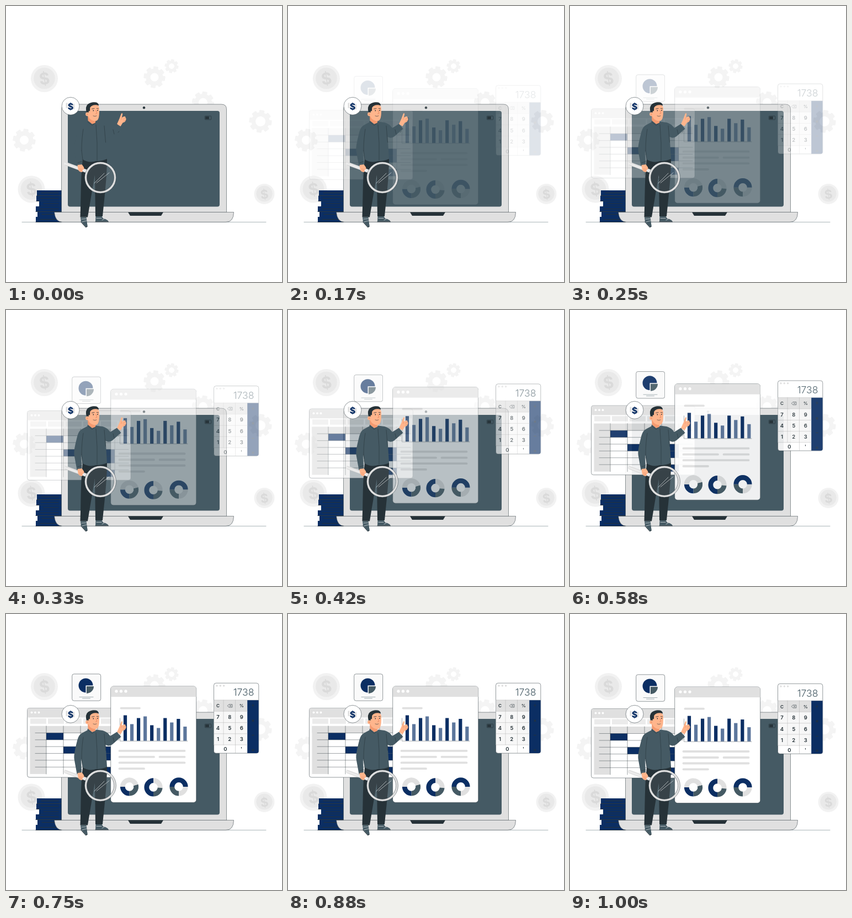
An HTML page for the animation above (1.04 s loop, 500 px wide and 500 px high).

```html
<!DOCTYPE html>
<html lang="en">
<head>
<meta charset="utf-8">
<title>Financial data</title>
<style>
  html, body { margin: 0; width: 100%; height: 100%; overflow: hidden; background: #fff; }
  svg { display: block; width: 100vw; height: 100vh; }
  text { font-family: Inter, Lato, sans-serif; text-anchor: middle; dominant-baseline: central; }
</style>
</head>
<body>
<svg id="stage" viewBox="0 0 500 500"></svg>
<script>
const NAVY = '#0b2e63', SLATE = '#455a64', INK = '#263238', GREY = '#e0e0e0', SKIN = '#ffb58c';
const EDGE = `stroke="${INK}" stroke-width=".5"`;

const rect = (x, y, w, h, fill, more = '') =>
  `<rect x="${x}" y="${y}" width="${w}" height="${h}" fill="${fill}" ${more}/>`;
const circle = (x, y, r, fill, more = '') =>
  `<circle cx="${x}" cy="${y}" r="${r}" fill="${fill}" ${more}/>`;
const path = (d, fill, more = '') => `<path d="${d}" fill="${fill}" ${more}/>`;
const line = (d, color, width = 0.5, more = '') =>
  path(d, 'none', `stroke="${color}" stroke-width="${width}" stroke-linecap="round" ${more}`);
const text = (x, y, size, str, fill = INK, weight = 500, more = '') =>
  `<text x="${x}" y="${y}" font-size="${size}" font-weight="${weight}" fill="${fill}" ${more}>${str}</text>`;
const dots = (x, y, gap, r, fill) => [0, 1, 2].map(i => circle(x + i * gap, y, r, fill)).join('');
const pop = inner => `<g class="pop">${inner}</g>`;

// Angles run clockwise in degrees from the top.
function ring(cx, cy, r, width, from, to, color) {
  const at = a => {
    const q = (a - 90) * Math.PI / 180;
    return `${cx + r * Math.cos(q)} ${cy + r * Math.sin(q)}`;
  };
  return path(`M${at(from)}A${r} ${r} 0 ${to - from > 180 ? 1 : 0} 1 ${at(to)}`, 'none',
    `stroke="${color}" stroke-width="${width}"`);
}

function gear(x, y, r, hole, turn = 0) {
  const fill = '#f4f4f4', mid = (r * 0.8 + hole) / 2;
  let teeth = '';
  for (let i = 0; i < 8; i++) {
    teeth += rect(-r * 0.23, -r, r * 0.46, r * 0.4, fill,
      `rx="${r * 0.08}" transform="rotate(${i * 45})"`);
  }
  return `<g transform="translate(${x} ${y}) rotate(${turn})">${teeth}` +
    circle(0, 0, mid, 'none', `stroke="${fill}" stroke-width="${r * 0.8 - hole}"`) + '</g>';
}

const coin = (x, y, r) =>
  circle(x, y, r, '#f2f2f2') + circle(x, y - 0.5, r * 0.79, '#e9e9e9') +
  text(x, y, r * 1.2, '$', '#dadada', 700, `transform="rotate(-8 ${x} ${y})"`);

function backdrop() {
  const slabs = [[56, 334], [55, 344], [60, 353.5], [54, 363], [57, 373], [54, 382]];
  return gear(269, 129, 19.5, 7.5, 8) + gear(300, 109, 12.5, 5, 10) + gear(357, 175, 20, 8, 10) +
    gear(461, 209, 20.5, 9, 8) + gear(33, 243, 20.5, 8, 10) +
    coin(69.5, 131.5, 24.5) + coin(46, 332, 24.5) + coin(468, 340.5, 18.5) +
    line('M29 391.5H471', SLATE, 0.45) +
    slabs.map(([x, y]) => rect(x, y, 101 - x, 9.7, NAVY) +
      line(`M${x} ${y + 9.5}H101M${x + 8} ${y + 4.5}H95`, INK, 0.9)).join('');
}

function laptop() {
  return path('M100.5 374V187Q100.5 178 110 178H390Q399.5 178 399.5 187V374Z', GREY, EDGE) +
    rect(112, 190, 275, 173.5, SLATE, 'rx="4"') + circle(250, 184.2, 2.2, INK) +
    rect(360.3, 199.3, 11.4, 6.6, 'none', `rx="1" stroke="${INK}" stroke-width=".7"`) +
    rect(361.3, 200.3, 6.5, 4.6, INK) +
    path('M87.5 373.5H412.5Q412.5 391.5 398 391.5H102Q89 391 87.5 373.5Z', GREY, EDGE) +
    path('M221 373.5H285L281 380H225Z', INK);
}

function sheet() {
  const rows = [216.5, 229, 241.3, 253.7, 266, 278.4];
  const cols = [73, 104, 135, 166, 197];
  const cell = (col, row) => rect(cols[col], rows[row], 31, 12.5, NAVY);
  return rect(38.5, 171.5, 187.5, 125.5, '#fff', `rx="4" ${EDGE}`) +
    path('M38.7 188.5V175.5Q38.7 171.7 42.5 171.7H222Q225.8 171.7 225.8 175.5V188.5Z', GREY) +
    dots(46.5, 179.5, 6.5, 1.9, '#fff') +
    [44, 76, 108, 140, 172].map(x => rect(x, 190.5, 29, 9.5, '#ebebeb')).join('') +
    rect(43.5, 204, 178.5, 12.5, GREY) + rect(43.5, 204, 29.5, 87, GREY) +
    cell(0, 0) + cell(1, 2) + cell(3, 2) + cell(3, 3) + cell(3, 5) +
    line(rows.map(y => `M53 ${y}H222`).join('') +
      cols.map(x => `M${x} 204V291`).join(''), INK, 0.45);
}

function pieCard() {
  return rect(119.7, 109.8, 52, 48.5, '#fafafa', `rx="3.5" ${EDGE}`) +
    path('M144.5 130.5V143.5A13 13 0 1 1 157.5 130.5Z', NAVY) +
    path('M146 132H159A13 13 0 0 1 146 145Z', SLATE) +
    line('M133 151.5H158M138.5 154H152.5', SLATE, 0.5);
}

function report() {
  const tops = [185, 201, 190, 187, 203, 208, 190, 198, 191.5, 205.5];
  const bars = tops.map((y, i) =>
    rect(212.9 + i * 12.04, y - 0.4, 6.2, 231.2 - y, i % 2 ? '#5c769c' : NAVY)).join('');
  const donuts = [
    [223.5, 314, [75, 180, SLATE], [180, 270, NAVY], [270, 435, GREY]],
    [267, 315, [0, 95, GREY], [95, 180, SLATE], [180, 360, NAVY]],
    [313, 314, [90, 180, GREY], [180, 270, SLATE], [270, 450, NAVY]]
  ].map(([x, y, ...parts]) => parts.map(p => ring(x, y, 12.2, 8.8, ...p)).join('')).join('');
  return rect(189.7, 132, 155, 210.5, '#fff', `rx="5" ${EDGE}`) +
    path('M190 151V137Q190 132.2 195 132.2H339.5Q344.5 132.2 344.5 137V151Z', GREY) +
    dots(200, 141, 8.5, 2.6, '#fff') +
    line('M208.5 171.7H242M205.5 249H323.5M205.5 260H268M278.5 260H323.5M205.5 270.5H323.5M205.5 281.3H250',
      GREY, 3.8) +
    bars + line('M206.5 190V231.3H329', INK, 0.4) + donuts;
}

function calculator() {
  const xs = [384, 405.3, 426.7], ys = [167.5, 187.5, 208, 228];
  const keys = ys.map((y, r) => xs.map((x, c) => {
    if (!r && c === 1) {
      return path(`M${x - 4} ${y}l2.5 -2.6h6v5.2h-6z`, 'none', `stroke="${INK}" stroke-width=".6"`) +
        line(`M${x} ${y - 1.2}l2.4 2.4m0 -2.4l-2.4 2.4`, INK, 0.6);
    }
    return text(x, y, r ? 9.5 : 8, r ? 10 - 3 * r + c : 'C %'[c], INK, 600);
  }).join('')).join('');
  const signs = [...'÷×−='].map((s, i) => text(447.3, 167 + i * 26.5, 9.5, s)).join('');
  return rect(376.5, 126.3, 81.3, 127, '#fff', `rx="4" ${EDGE}`) +
    dots(382, 131, 6.3, 1.8, GREY) +
    text(430.5, 143, 17.5, '1738', SLATE, 300) +
    rect(376.7, 157, 60.5, 20.4, GREY) + rect(376.7, 177.4, 60.5, 60.8, '#f7f7f7') +
    path('M437.2 157H457.6V249.5Q457.6 253 454 253H437.2Z', NAVY) +
    line('M376.7 157H457.6M376.7 177.4H437.2M376.7 197.8H437.2M376.7 218H437.2M376.7 238.2H437.2' +
      'M394 157V238.2M415.5 157V253', '#b0b0b0', 0.5) +
    keys + signs + text(397.5, 246, 9.5, '0', INK, 600) + text(426.5, 246, 9, "'", INK, 600);
}

function man() {
  const legs =
    path('M139 277H183C183 310 178 350 175 381H162L161 306Q154 345 148 382.5H134.5C136 345 135 310 139 277Z', INK);
  const shoes =
    path('M135 382.5H145.5L147.5 397Q148 401.5 144.5 400.5L136 391Z', SLATE) +
    path('M162.5 381H173.5L176 385Q185 387 185.5 390.5H162Z', SLATE) +
    line('M137 386L145 385.5M138 391L146 389M164 384.5H173M174 388L178 386', '#fff', 0.6) +
    line('M135.5 391L144.5 401L147.5 399M162 391H185.5', INK, 1);
  const pointing =
    path('M201 214L205.5 204L208.7 195.2Q210.3 193 211.3 195.6L209.8 202L214 200Q217 199.5 216.5 202.5' +
      'Q218.5 204 217 207Q216 210.5 211.5 211.5L207.5 218Z', SKIN) +
    line('M209.8 202L208.5 206M216 203L212 205.5M217 207L213 208.5', '#e5825c', 0.5);
  const shirt =
    path('M148 207.5L147.5 210.5L139 215Q132 218 129.3 228C125.5 244 122.3 255 123.8 264L128.5 290L137 288' +
      'L136 262L139 278Q150 285 163 281Q174 281 183 277L180.5 237Q187 241 193 236L208.5 222.5' +
      'L201 213.5L189 221Q183 213 175 211L163 209.5L162 212L156 214Z', SLATE) +
    line('M140 223Q137 240 137 262M137 262L139 278M163 215Q166 248 165 280M178 217L180.5 247' +
      'M148 210L156 216L163 211M194 224L196 232M203 229L205 227M130 284L137 282', INK, 0.55);
  const head =
    path('M148 197L148.5 208L156 214L162 212V203Z', '#f49a70') +
    path('M147.5 184Q149 177 158 177Q169 177 169 187C169.2 200 168 208.5 161.5 208.5Q153 208 149 200Z', SKIN) +
    path('M146 194Q142.8 182 148.5 177.8Q155 173 163 174.6Q167.5 175.6 168.2 180.5Q160 177.6 154.5 181.5' +
      'L152.3 184L152 190.5L150 190L149.5 194Z', INK) +
    circle(147.5, 196, 3.4, SKIN) + circle(147.3, 196, 1.5, '#f49a70') +
    circle(158.3, 189.5, 0.9, INK) + circle(166, 189.2, 0.9, INK) +
    line('M155.5 186.4L160 185.6M164.3 185.6L167.5 186', INK, 0.8) +
    line('M163 189L164.8 194.5L162.3 195.3', '#d9704c', 0.6) +
    line('M158 199Q161 201 164 199', INK, 0.6);
  return legs + shoes + pointing + head + shirt;
}

function magnifier() {
  return line('M108 285.5L145 299', '#ebebeb', 6) +
    line('M107 283L145 296.8M107 288L143 301.5', '#b5b5b5', 0.4) +
    circle(171, 310.8, 25, '#fff', 'fill-opacity=".08"') +
    circle(171, 310.8, 26.5, 'none', 'stroke="#ebebeb" stroke-width="3.8"') +
    [28.4, 24.6].map(r => circle(171, 310.8, r, 'none', EDGE)).join('') +
    circle(171, 310.8, 26.3, 'none', 'stroke="#b8b8b8" stroke-width=".5"') +
    line('M160 321L178 303M164 320.5L187 302', '#fff', 0.6) +
    path('M129.5 288L137.5 287L141 292Q142.5 296 139 297L138 301Q132 301 130.5 296Z', SKIN) +
    line('M133 295L138 296M133 298L138 298.5', '#e5825c', 0.5);
}

const bubble = () =>
  circle(117, 181.3, 16, '#fff', EDGE) + rect(108.5, 175.5, 3, 9.5, GREY) +
  rect(121.5, 177.5, 2.8, 9.5, GREY) + text(117, 181.8, 16, '$', NAVY, 800);

document.getElementById('stage').innerHTML =
  backdrop() + laptop() + pop(sheet()) + pop(pieCard()) + pop(report()) + pop(calculator()) +
  man() + magnifier() + bubble();

// Cubic bezier (.36, -.01, .5, 1.38), solved by bisection.
function ease(x) {
  const curve = (s, a, b) => 3 * a * s * (1 - s) ** 2 + 3 * b * s * s * (1 - s) + s ** 3;
  let lo = 0, hi = 1;
  for (let i = 0; i < 24; i++) {
    const mid = (lo + hi) / 2;
    if (curve(mid, 0.36, 0.5) < x) lo = mid; else hi = mid;
  }
  return curve((lo + hi) / 2, -0.01, 1.38);
}

const LOOP = 1040, STEPS = 25, RISE = 20;
const panels = document.querySelectorAll('.pop');

// The pose holds for each step and is sampled at the step's middle.
function draw() {
  const t = performance.now() % LOOP;
  const step = Math.floor((t + 5) / (LOOP / STEPS)) % STEPS;
  const p = ease(Math.min(1, (step + 0.5) / (STEPS - 1)));
  for (const panel of panels) {
    panel.setAttribute('transform', `translate(0 ${RISE * (1 - p)})`);
    panel.setAttribute('opacity', Math.max(0, Math.min(1, p)));
  }
  requestAnimationFrame(draw);
}
draw();
</script>
</body>
</html>
```
